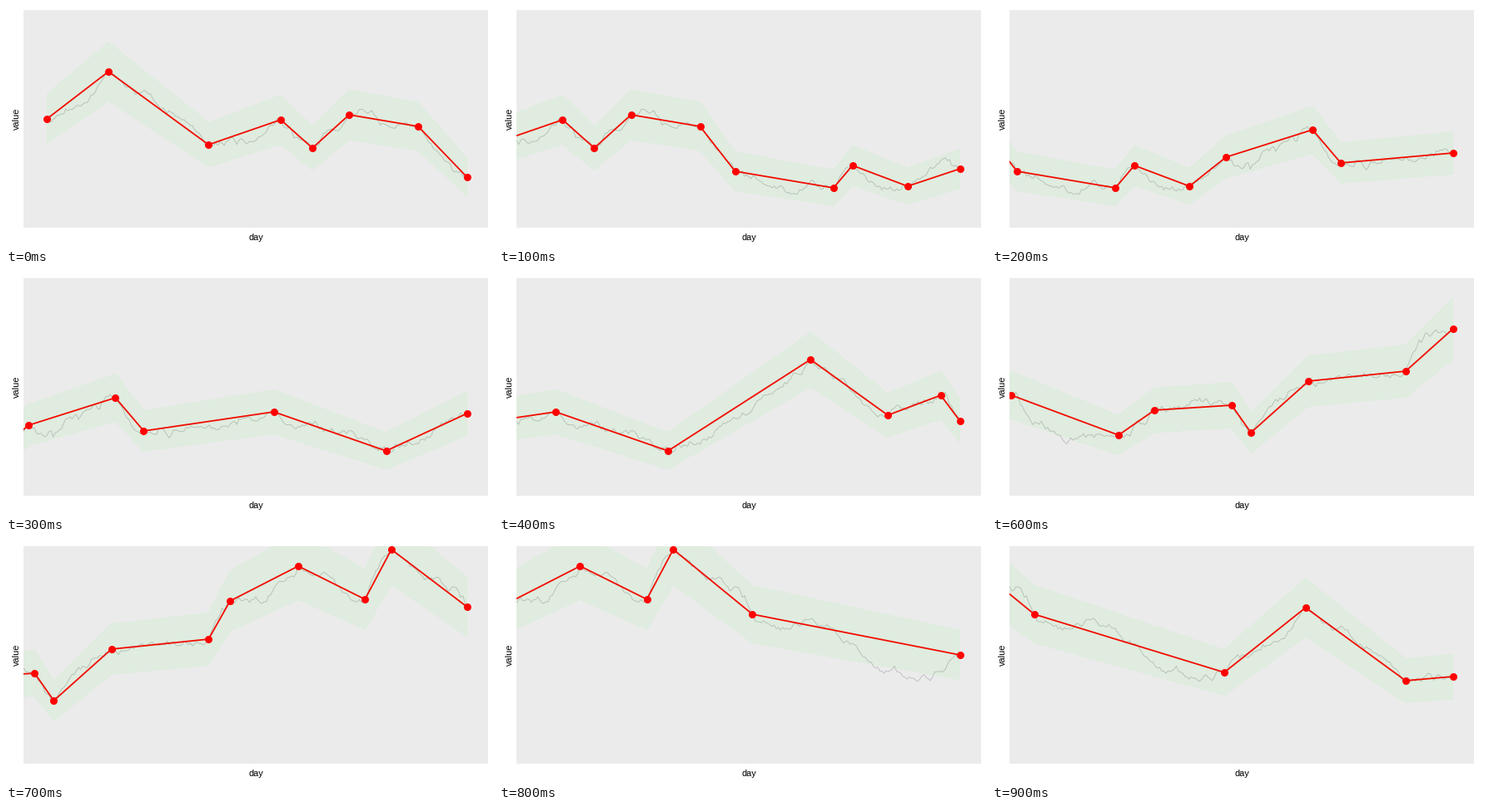
Animation of 585x289 px, one loop 1000 ms. Source, as a matplotlib script:

```python
import matplotlib.pyplot as plt
import numpy as np
from matplotlib.animation import FuncAnimation
from matplotlib.patches import Polygon, Rectangle

W, H, DPI = 585, 289, 64
PX = 72 / DPI                    # points per pixel
FRAMES, INTERVAL = 10, 100
PERIOD, WINDOW, SHIFT = 1000, 200, 100   # days
LEFT, DAY_WIDTH = 46.5, 2.536
ZERO_Y = 432                     # screen height of value zero
MIN_BEND = 26                    # bend that makes the newest turn count
DAILY_STEP = 2.6

# Turning points of the trend: (day, screen y)
TURNS = np.array([
    (30.2, 79), (77.6, 167), (111.8, 137), (126.8, 171), (144.2, 131),
    (176.9, 145), (193.5, 199), (240.1, 219), (249.1, 192), (275.2, 217),
    (292.5, 182), (333.5, 149), (346.9, 189), (408.5, 166), (461.7, 213),
    (529.2, 103), (565.8, 170), (590.9, 146), (641.6, 194), (658.6, 164),
    (695.2, 158), (704.3, 191), (731.6, 129), (777.6, 117), (787.8, 71),
    (820.1, 29), (851.7, 69), (864.2, 9), (901.7, 87), (991.7, 157)])

# Screen y on day 1 and at the end of every hundred days
CLOSES = [136, 162, 206, 196, 177, 168, 177, 181, 66, 78, 136]


def build_series():
    """Random walk tied down at the turning points and closes."""
    days = np.arange(1, PERIOD + 1)
    close_days = np.maximum(1, np.arange(len(CLOSES)) * SHIFT)
    knots = np.vstack([TURNS, np.column_stack([close_days, CLOSES])])
    knot_days, heights = knots[knots[:, 0].argsort()].T
    walk = np.random.default_rng(11).normal(0, DAILY_STEP, PERIOD).cumsum()
    offset = heights - np.interp(knot_days, days, walk)
    return walk + np.interp(days, knot_days, offset)


SERIES = build_series()


def value_y(days):
    return SERIES[(np.asarray(days) - 1) % PERIOD]


def trend(end):
    """Turns up to day `end`, closed with the latest value."""
    turns = np.vstack([(1, value_y(1)), TURNS, TURNS + (PERIOD, 0)])
    turns = turns[turns[:, 0] < end]
    close = np.array([end, value_y(end)])
    before, newest = turns[-2:]
    share = (newest[0] - before[0]) / (close[0] - before[0])
    straight = before[1] + share * (close[1] - before[1])
    if abs(newest[1] - straight) < MIN_BEND:
        turns = turns[:-1]
    return np.vstack([turns, close])


fig = plt.figure(figsize=(W / DPI, H / DPI), dpi=DPI, facecolor="white")
ax = fig.add_axes((0, 0, 1, 1))
ax.set(xlim=(0, W), ylim=(H, 0))
ax.axis("off")

panel = Rectangle((21, 5), 558, 262, fc="#ebebeb", ec="none",
                  antialiased=False)
ax.add_patch(panel)
daily, = ax.plot([], [], color="#bebebe", lw=0.9 * PX, zorder=2)
line, = ax.plot([], [], color="red", lw=1.8 * PX, zorder=3)
ribbon = Polygon([(0, 0), (0, 1), (1, 0)], fc="lime", alpha=0.05, ec="none",
                 antialiased=False, zorder=4)
ax.add_patch(ribbon)
dots, = ax.plot([], [], "o", color="red", ms=9 * PX, mew=0, zorder=5)
for artist in (daily, line, ribbon, dots):
    artist.set_clip_path(panel)

label = dict(ha="center", va="center", family="Liberation Sans",
             size=11 * PX, color="black")
ax.text(300, 278.5, "day", **label)
ax.text(12.7, 136, "value", rotation=90, **label)


def update(frame):
    first = frame * SHIFT
    end = first + WINDOW

    def to_x(days):
        return LEFT + DAY_WIDTH * (days - first)

    days = np.arange(max(1, first - 15), end + 1)
    daily.set_data(to_x(days), value_y(days))

    points = trend(end)
    x, y = to_x(points[:, 0]), points[:, 1]
    line.set_data(x, y)
    dots.set_data(x, y)
    half = 0.1 * (ZERO_Y - y)
    ribbon.set_xy(np.vstack([np.column_stack([x, y - half]),
                             np.column_stack([x, y + half])[::-1]]))
    return daily, line, ribbon, dots


anim = FuncAnimation(fig, update, frames=FRAMES, interval=INTERVAL,
                     repeat=True, repeat_delay=0, blit=False)
plt.show()
```
